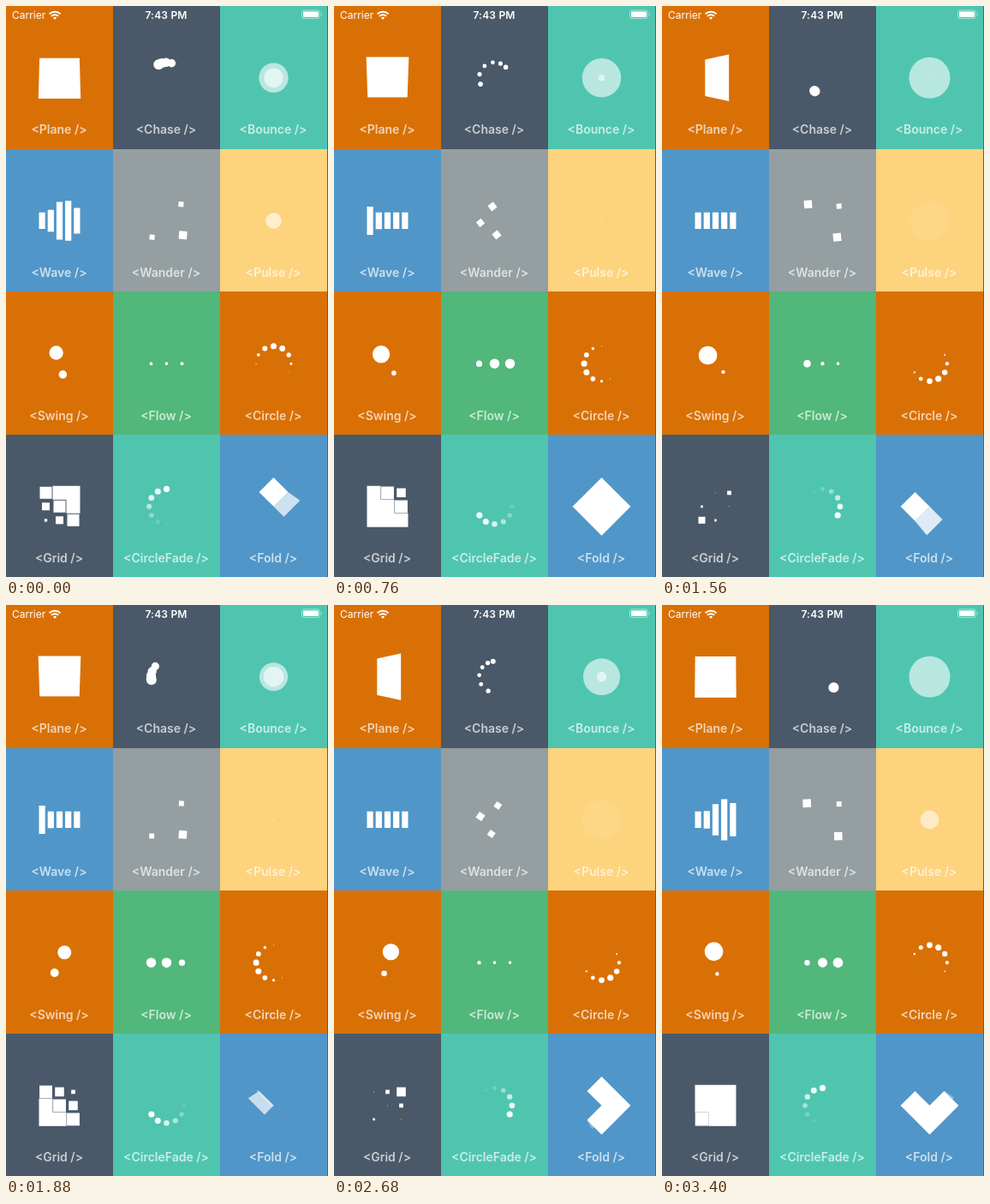
Animation, 376 px wide and 666 px high, one loop 3.44 s. Source, as an HTML page with a canvas:

```html
<!DOCTYPE html>
<html lang="en">
<head>
<meta charset="utf-8">
<title>Spinners</title>
<style>
  html, body { margin: 0; width: 376px; height: 666px; overflow: hidden; background: #46686e; }
  canvas, svg, span { position: absolute; left: 0; top: 0; }
  span { color: #fff; font: 400 12px/16px Inter, sans-serif; white-space: pre; }
  .label { width: 125px; text-align: center; font: 600 14px/20px Inter, sans-serif; opacity: .7; }
  .carrier { left: 7px; top: 2.5px; }
  .clock { left: 0; top: 2.5px; width: 374px; text-align: center; font-weight: 600; letter-spacing: .2px; }
</style>
</head>
<body>
<canvas width="376" height="666"></canvas>
<svg width="376" height="22" fill="none" stroke="#fff">
  <path d="M50.6 9.4a9.2 9.2 0 0 1 13 0M53 11.9a5.8 5.8 0 0 1 8.2 0" stroke-width="1.9"/>
  <path d="M57.1 16l-2.1-2.2a3 3 0 0 1 4.2 0z" fill="#fff" stroke="none"/>
  <rect x="345.5" y="5" width="21" height="9.6" rx="2.6" stroke-opacity=".5"/>
  <rect x="347" y="6.5" width="18" height="6.6" rx="1.4" fill="#fff" stroke="none"/>
  <path d="M368 8.2a2 2 0 0 1 0 3.4z" fill="#fff" fill-opacity=".5" stroke="none"/>
</svg>
<span class="carrier">Carrier</span>
<span class="clock">7:43 PM</span>
<script>
const LOOP = 3440, STEP = 40, SIZE = 48, HALF = 24, TAU = Math.PI * 2;
const ctx = document.querySelector('canvas').getContext('2d');
const mod = (a, n) => ((a % n) + n) % n;
const phase = (t, start, period) => mod(t - start, period) / period;
const rad = deg => deg * Math.PI / 180;
const linear = x => x;

// cubic-bezier(.42, 0, .58, 1)
function ease(x) {
  let lo = 0, hi = 1, s = .5;
  for (let i = 0; i < 20; i++) {
    s = (lo + hi) / 2;
    const q = 1 - s;
    if (3 * q * q * s * .42 + 3 * q * s * s * .58 + s ** 3 < x) lo = s; else hi = s;
  }
  return s * s * (3 - 2 * s);
}

// Value at p between keyframes, eased within each span
function key(p, at, values, f = ease) {
  let i = 1;
  while (i < at.length - 1 && p > at[i]) i++;
  return values[i - 1] + (values[i] - values[i - 1]) * f((p - at[i - 1]) / (at[i] - at[i - 1]));
}

function disc(x, y, r) {
  ctx.moveTo(x + r, y);
  ctx.arc(x, y, r, 0, TAU);
}
const polar = (deg, dist, r) => disc(dist * Math.sin(rad(deg)), -dist * Math.cos(rad(deg)), r);
const box = (x, y, w, h) => ctx.rect(x - w / 2, y - h / 2, w, h);

function poly(points) {
  points.forEach(([x, y], i) => i ? ctx.lineTo(x, y) : ctx.moveTo(x, y));
  ctx.closePath();
}

function paint(alpha, draw) {
  ctx.globalAlpha = alpha;
  ctx.beginPath();
  draw();
  ctx.fill();
  ctx.globalAlpha = 1;
}

// rotateX(ax) after rotateY(ay), seen from distance d
function project([x, y], ax, ay, d) {
  const z = -x * Math.sin(ay);
  const k = d / (d - y * Math.sin(ax) - z * Math.cos(ax));
  return [x * Math.cos(ay) * k, (y * Math.cos(ax) - z * Math.sin(ax)) * k];
}

function plane(t) {
  const p = phase(t, -465, 1120);
  const ax = -rad(key(p, [0, .5, 1], [0, 180, 180]));
  const ay = -rad(key(p, [0, .5, 1], [0, 0, 180]));
  const corners = [[-1, -1], [1, -1], [1, 1], [-1, 1]];
  paint(1, () => poly(corners.map(([x, y]) => project([x * HALF, y * HALF], ax, ay, 160))));
}

function chase(t) {
  const turn = 360 * t / 2333 - 31;
  paint(1, () => {
    for (let i = 0; i < 6; i++) {
      const p = phase(t, -388 + 90 * i, 1867);
      polar(turn + key(p, [0, .8, 1], [0, 360, 360]), 18, 6 * key(p, [0, .5, 1], [1, .4, 1]));
    }
  });
}

function bounce(t) {
  for (const start of [-403, 530]) {
    const s = key(phase(t, start, 1867), [0, .45, .55, 1], [0, 1, 1, 0]);
    paint(.6, () => disc(0, 0, HALF * s));
  }
}

function wave(t) {
  paint(1, () => {
    for (let i = 0; i < 5; i++) {
      const s = key(phase(t, -469 + 93.3 * i, 1120), [0, .2, .4, 1], [.4, 1, .4, .4]);
      box((i - 2) * 10.2, 0, 7.2, SIZE * s);
    }
  });
}

function wander(t) {
  const q = (t - 80) / 467, side = Math.floor(q), e = ease(q - side);
  const inset = Math.min(1, Math.max(0, .5 + 2 * Math.cos(TAU * (t - 540) / 1867)));
  const reach = 19.2 - 2.7 * inset;
  for (let i = 1; i < 4; i++) {
    const s = mod(side + i, 4), size = 9.6 * (s % 2 ? .6 + .4 * e : 1 - .4 * e);
    ctx.save();
    ctx.rotate(s * TAU / 4);
    ctx.translate(reach * (2 * e - 1), -reach);
    ctx.rotate(-e * TAU / 4);
    paint(1, () => box(0, 0, size, size));
    ctx.restore();
  }
}

function pulse(t) {
  const e = ease(phase(t, -485, 1120));
  paint(1 - e, () => disc(0, 0, HALF * e));
}

function swing(t) {
  const turn = 343 + 360 * t / 1680;
  paint(1, () => {
    for (let i = 0; i < 2; i++) {
      const s = key(phase(t, 577 + 933.5 * i, 1867), [0, .5, 1], [.2, 1, .2]);
      polar(turn + 180 * i, 13.2, 10.8 * s);
    }
  });
}

function flow(t) {
  paint(1, () => {
    for (let i = 0; i < 3; i++) {
      const s = key(phase(t, -45 + 187 * i, 1307), [0, .4, .8, 1], [.3, 1, .3, .3]);
      disc(18 * (i - 1), 0, 6 * s);
    }
  });
}

function circle(t) {
  paint(1, () => {
    for (let i = 0; i < 12; i++) {
      const s = key(phase(t, -483 + 93.33 * i, 1120), [0, .4, .8, 1], [0, 1, 0, 0]);
      polar(30 * i, 20.4, 3.6 * s);
    }
  });
}

function circleFade(t) {
  for (let i = 0; i < 12; i++) {
    const a = key(phase(t, -462 + 93.33 * i, 1120), [0, .39, .4, 1], [0, 0, 1, 0]);
    paint(a, () => polar(30 * i, 20.4, 3.6 * (.6 + .4 * a)));
  }
}

function grid(t) {
  paint(1, () => {
    for (let row = 0; row < 3; row++) {
      for (let col = 0; col < 3; col++) {
        const start = -290 + 93.3 * (col + 2 - row);
        const s = 16 * key(phase(t, start, 1213), [0, .35, .7, 1], [1, 0, 1, 1]);
        box(16 * (col - 1), 16 * (row - 1), s, s);
      }
    }
  });
}

function fold(t) {
  const cubes = [0, 1, 2, 3].map(k => {
    const p = phase(t, -745 + 280 * k, 2240);
    const ax = rad(key(p, [0, .1, .25, 1], [-180, -180, 0, 0], linear));
    const ay = rad(key(p, [0, .75, .9, 1], [0, 0, 180, 180], linear));
    const alpha = key(p, [0, .1, .25, .75, .9, 1], [0, 0, 1, 1, 0, 0], linear);
    const turn = rad(45 + 90 * k), c = Math.cos(turn), s = Math.sin(turn);
    const points = [[0, 0], [-HALF, 0], [-HALF, -HALF], [0, -HALF]]
      .map(v => project(v, ax, ay, 180))
      .map(([x, y]) => [x * c - y * s, x * s + y * c]);
    return { alpha, points };
  });
  paint(1, () => cubes.filter(q => q.alpha === 1).forEach(q => poly(q.points)));
  cubes.filter(q => q.alpha < 1).forEach(q => paint(q.alpha, () => poly(q.points)));
}

const orange = '#d97006', slate = '#4a5969', teal = '#4fc5b0', blue = '#5196c8';
const cells = [
  ['Plane', orange, plane], ['Chase', slate, chase], ['Bounce', teal, bounce],
  ['Wave', blue, wave], ['Wander', '#959ea0', wander], ['Pulse', '#fdd37e', pulse],
  ['Swing', orange, swing], ['Flow', '#52b77a', flow], ['Circle', orange, circle],
  ['Grid', slate, grid], ['CircleFade', teal, circleFade], ['Fold', blue, fold]
].map(([name, color, draw], i) => ({ name, color, draw, x: 125 * (i % 3), row: Math.floor(i / 3) }));

for (const { name, x, row } of cells) {
  const label = document.createElement('span');
  label.className = 'label';
  label.textContent = `<${name} />`;
  label.style.left = x - .5 + 'px';
  label.style.top = Math.round(134 + 166.8 * row) + 'px';
  document.body.append(label);
}

function frame(now) {
  const t = Math.floor(now % LOOP / STEP) * STEP;
  for (const { color, draw, x, row } of cells) {
    const top = Math.round(166.7 * row);
    ctx.fillStyle = color;
    ctx.fillRect(x, top, 125, 167);
    ctx.save();
    ctx.translate(x + 62.5, 83.75 + 166.7 * row);
    ctx.fillStyle = '#fff';
    draw(t);
    ctx.restore();
  }
}

const begin = performance.now();
function tick() {
  frame(performance.now() - begin);
  requestAnimationFrame(tick);
}
tick();
</script>
</body>
</html>
```
